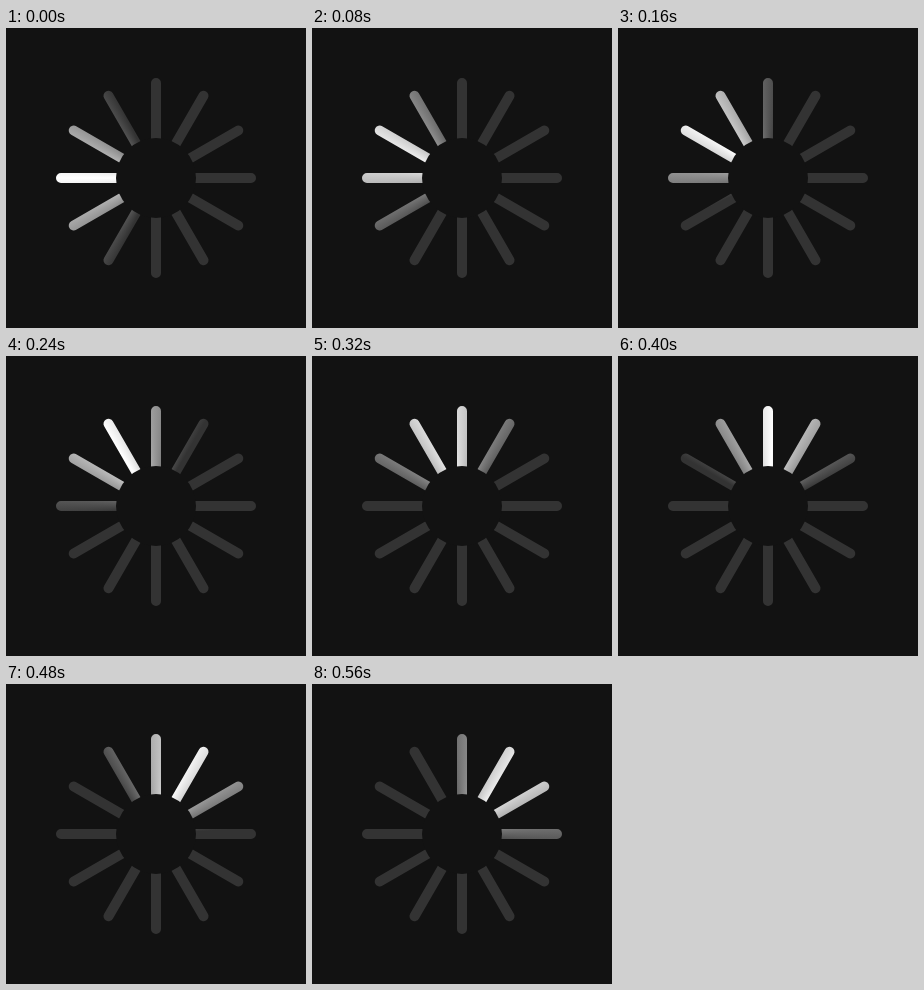
An HTML page with a canvas for the animation above (0.64 s loop, 300 by 300 pixels).

```html
<!DOCTYPE html>
<html lang="en">
<head>
<meta charset="utf-8">
<title>Spinner</title>
<style>
  html, body { margin: 0; height: 100%; overflow: hidden; background: #121212; }
  canvas { display: block; }
</style>
</head>
<body>
<canvas width="300" height="300"></canvas>
<script>
  const ctx = document.querySelector('canvas').getContext('2d');
  const BACKGROUND = '#121212', DIM = '#333', BRIGHT = '#fff';
  const CENTER = 150, SPOKES = 12;
  const STEP_MS = 80, STEPS = 8, SWEEP = 150; // degrees swept per loop
  const FALLOFF = 64 / 360; // share of a turn over which the light fades
  const radians = degrees => degrees * Math.PI / 180;

  // Round outer ends; the hub disc trims the inner ends.
  const spokes = new Path2D();
  for (let i = 0; i < SPOKES; i++) {
    const angle = radians(i * 360 / SPOKES);
    for (const [method, radius] of [['moveTo', 35], ['lineTo', 95]]) {
      spokes[method](CENTER + radius * Math.cos(angle), CENTER + radius * Math.sin(angle));
    }
  }
  const hub = new Path2D();
  hub.arc(CENTER, CENTER, 40, 0, 2 * Math.PI);

  function lightAt(degrees) {
    const light = ctx.createConicGradient(radians(degrees), CENTER, CENTER);
    light.addColorStop(0, BRIGHT);
    light.addColorStop(FALLOFF, DIM);
    light.addColorStop(1 - FALLOFF, DIM);
    light.addColorStop(1, BRIGHT);
    return light;
  }

  function draw(now) {
    const step = Math.floor(now / STEP_MS) % STEPS;
    ctx.fillStyle = BACKGROUND;
    ctx.fillRect(0, 0, 300, 300);
    ctx.lineWidth = 10;
    ctx.lineCap = 'round';
    ctx.strokeStyle = lightAt(180 + SWEEP * step / STEPS);
    ctx.stroke(spokes);
    ctx.fill(hub);
  }

  const start = performance.now();
  function tick() {
    draw(performance.now() - start);
    requestAnimationFrame(tick);
  }
  tick();
</script>
</body>
</html>
```
